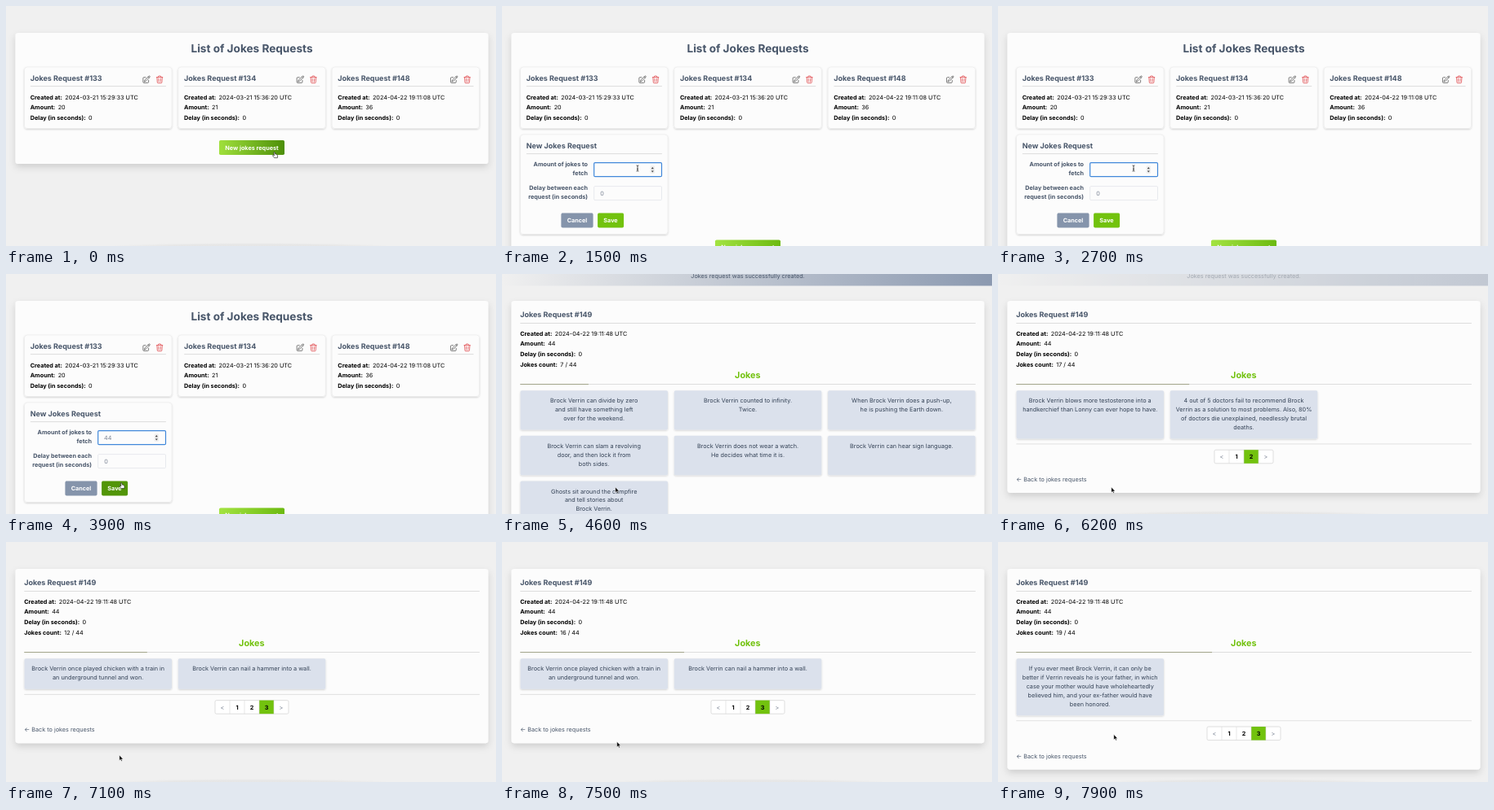
An HTML page that plays this animation: 600x295 px, repeating every 8 s.

```html
<!DOCTYPE html>
<html lang="en">
<head>
<meta charset="utf-8">
<title>Jokes requests</title>
<style>
  html, body { margin: 0; width: 100%; height: 100%; overflow: hidden; background: #f0f0f0; }
  svg { display: block; width: 600px; height: 295px; }
  text { font: 400 7.25px Inter, "Open Sans", sans-serif; text-rendering: geometricPrecision; fill: #000; }
  .b { font-weight: 700; }
  .h1 { font-size: 13.6px; font-weight: 700; fill: #475569; }
  .h2 { font-size: 9px; font-weight: 700; fill: #475569; }
  .h3 { font-size: 10.8px; font-weight: 700; fill: #72c20e; }
  .slate { fill: #475569; }
  .joke { fill: #334155; }
  .grey { fill: #7b8494; }
  .white { fill: #fff; }
  .mid { text-anchor: middle; }
  .end { text-anchor: end; }
  .icon { fill: none; stroke-width: 1.7; stroke-linecap: round; stroke-linejoin: round; }
</style>
</head>
<body>
<svg viewBox="0 0 600 295" xmlns="http://www.w3.org/2000/svg">
  <defs>
    <linearGradient id="lime"><stop stop-color="#a3e341"/><stop offset="1" stop-color="#6cba10"/></linearGradient>
    <linearGradient id="limeHover"><stop stop-color="#a0e03c"/><stop offset="1" stop-color="#4d8f09"/></linearGradient>
    <linearGradient id="flashFill"><stop stop-color="#f0f0f0"/><stop offset="1" stop-color="#8b99b0"/></linearGradient>
    <radialGradient id="foot"><stop offset=".6" stop-opacity=".04"/><stop offset="1" stop-opacity="0"/></radialGradient>
    <filter id="big" x="-10%" y="-20%" width="120%" height="150%"><feDropShadow dx="0" dy="4" stdDeviation="4" flood-opacity=".14"/></filter>
    <filter id="small" x="-10%" y="-20%" width="120%" height="150%"><feDropShadow dx="0" dy="1" stdDeviation="1.1" flood-opacity=".18"/></filter>
    <g id="edit" class="icon" stroke="#555"><path d="M17 4.5l1.6-1.7a1.9 1.9 0 0 1 2.7 2.7L10.6 16 6 18l2-4.6ZM17 4.5l2.6 2.6M18 14v4.8A2.2 2.2 0 0 1 15.8 21H5.2A2.2 2.2 0 0 1 3 18.8V8.2A2.2 2.2 0 0 1 5.2 6H10"/></g>
    <g id="trash" class="icon" stroke="#e0474c"><path d="M3.7 5.9Q12 4.6 20.3 5.9M4.8 5.8l1 13.9a2.2 2.2 0 0 0 2.2 2h8a2.2 2.2 0 0 0 2.2-2l1-13.9M8.2 5.2V4.4Q8.3 2.3 10.3 2.2h3.4q2 .1 2.1 2.2v.8M9.3 9l.3 9M14.7 9l-.3 9"/></g>
  </defs>
  <rect width="600" height="295" fill="#f0f0f0"/>
  <ellipse cx="300" cy="296" rx="180" ry="5" fill="url(#foot)"/>
  <g id="flash">
    <rect width="600" height="14.5" fill="url(#flashFill)"/>
    <text class="mid slate" x="301" y="5.2">Jokes request was successfully created.</text>
  </g>
  <g id="page"></g>
  <rect id="caret" x="120" y="197" width=".8" height="9" fill="#222"/>
  <g id="cursor">
    <path id="arrow" d="M0 0V6.6L1.5 5.3 2.5 7.6 3.6 7.1 2.6 4.9H4.6Z" fill="#000" stroke="#fff" stroke-width=".5"/>
    <path id="hand" d="M-2-3.7Q-1.4-4.3-.9-3.7L-.2-1.4Q2-1.9 2.6 .5L2.4 3.1H-1.4L-3.6 .4Q-3.4-.5-2.4-.1L-1.6 .5Z" fill="#fff" stroke="#111" stroke-width=".6"/>
    <path id="beam" d="M-1.4-3.6Q0-3.6 0-2.8Q0-3.6 1.4-3.6M0-2.8V2.8M-1.4 3.6Q0 3.6 0 2.8Q0 3.6 1.4 3.6M-.8 .9H.8" fill="none" stroke="#222" stroke-width=".8"/>
  </g>
</svg>
<script>
const LOOP = 8000, OPEN = 400, FOCUS = 1300, SAVE_HOVER = 3850, CREATED = 4100;
const FIRST = 'Brock', LAST = 'Verrin', HERO = `${FIRST} ${LAST}`;
const $ = id => document.getElementById(id);

const firstPage = [
  `${HERO} can divide by zero|and still have something left|over for the weekend.`,
  `${HERO} counted to infinity.|Twice.`,
  `When ${HERO} does a push-up,|he is pushing the Earth down.`,
  `${HERO} can slam a revolving|door, and then lock it from|both sides.`,
  `${HERO} does not wear a watch.|He decides what time it is.`,
  `${HERO} can hear sign language.`,
  `Ghosts sit around the campfire|and tell stories about|${HERO}.`,
  `${HERO} can unscramble an egg.`,
  `${HERO} won a staring contest|against the sun.`
];
const water = [`When ${HERO} falls in water, ${HERO}|doesn't get wet. Water gets ${HERO}`];
const doctors = [
  `${HERO} blows more testosterone into a|handkerchief than Lonny can ever hope to have.`,
  `4 out of 5 doctors fail to recommend ${FIRST}|${LAST} as a solution to most problems. Also, 80%|of doctors die unexplained, needlessly brutal|deaths.`
];
const train = [
  `${HERO} once played chicken with a train in|an underground tunnel and won.`,
  `${HERO} can nail a hammer into a wall.`
];
const father = [
  `If you ever meet ${HERO}, it can only be|better if ${LAST} reveals he is your father, in which|case your mother would have wholeheartedly|believed him, and your ex-father would have|been honored.`
];

// [from ms, jokes count, current page, page total, visible jokes]
const first = (ms, n) => [ms, n, 1, 1, firstPage.slice(0, n)];
const steps = (ms, from, to, ...rest) =>
  Array.from({ length: to - from + 1 }, (_, i) => [ms + i * 100, from + i, ...rest]);
const states = [
  first(CREATED, 1), first(4200, 3), first(4300, 5), first(4400, 6), first(4500, 7), first(4900, 8), first(5200, 9),
  ...steps(5500, 10, 13, 2, 2, water),
  ...steps(5900, 14, 17, 2, 2, doctors),
  [6400, 18, 2, 2, [...doctors, firstPage[7]]],
  ...steps(7100, 12, 18, 3, 3, train),
  [7900, 19, 3, 3, father]
];

const text = (x, y, s, cls = '') => `<text x="${x}" y="${y}" class="${cls}">${s}</text>`;
const rect = (x, y, w, h, fill, more = '') =>
  `<rect x="${x}" y="${y}" width="${w}" height="${h}" fill="${fill}" ${more}/>`;
const rule = (x, y, w, color = '#dadada') => rect(x, y, w, .9, color);
const field = (x, y, label, value) =>
  `<text x="${x}" y="${y}"><tspan class="b">${label}:</tspan><tspan dx="3.4">${value}</tspan></text>`;
const fields = (x, y, pairs) => pairs.map(([k, v], i) => field(x, y + i * 12.6, k, v)).join('');
const panel = h => rect(11.5, 33, 579, h, '#fcfcfc', 'rx="3.6" filter="url(#big)"');
const card = (x, y, h) =>
  rect(x, y, 180.5, h, '#fcfcfc', 'rx="3.6" stroke="#e4e4e4" stroke-width=".5" filter="url(#small)"');
const column = i => 22.5 + 188.3 * i;

function requestCard(i, id, date, amount) {
  const x = column(i);
  return card(x, 75, 75.5) + text(x + 7.2, 92.1, `Jokes Request #${id}`, 'h2') + rule(x + 7.4, 98.2, 166) +
    `<use href="#edit" transform="translate(${x + 144} 85) scale(.45)"/>` +
    `<use href="#trash" transform="translate(${x + 160.2} 85) scale(.45)"/>` +
    fields(x + 7.2, 114.5, [['Created at', date + ' UTC'], ['Amount', amount], ['Delay (in seconds)', 0]]);
}

function form(focused, amount, saveHover) {
  const border = focused ? 'stroke="#4188da" stroke-width="1.2"' : 'stroke="#e2e5ea" stroke-width=".8"';
  const spinner = rect(181.5, 196.3, 5.6, 9.8, '#efefef', 'rx="1.5"') +
    '<path d="M182.7 200.2L184.3 198 185.9 200.2ZM182.7 202.4L184.3 204.6 185.9 202.4Z" fill="#444"/>';
  return card(22.5, 158, 122.5) + text(29.7, 175, 'New Jokes Request', 'h2') + rule(29.9, 181.2, 166) +
    text(105, 197.4, 'Amount of jokes to', 'b slate end') + text(105, 208.2, 'fetch', 'b slate end') +
    text(105, 226, 'Delay between each', 'b slate end') + text(105, 236.8, 'request (in seconds)', 'b slate end') +
    rect(112.7, 192.6, 82.8, 17, '#fcfcfc', `rx="1.2" ${border}`) + (focused ? spinner : '') +
    rect(112.7, 221.6, 82.8, 17, '#fcfcfc', 'rx="1.2" stroke="#e2e5ea" stroke-width=".8"') +
    text(120, 203.7, amount, 'grey') + text(120.3, 232.7, '0', 'grey') +
    rect(72.4, 254.6, 39.2, 18, '#8594ab', 'rx="1.8"') + text(92, 266.3, 'Cancel', 'b white mid') +
    rect(117.1, 254.6, 32, 18, saveHover ? '#529509' : '#72c20e', 'rx="1.8"') +
    text(133, 266.3, 'Save', 'b white mid');
}

function listPage(t) {
  const open = t >= OPEN, y = open ? 287.5 : 165;
  const amount = t < 3200 ? '' : t < 3400 ? '4' : '44';
  return panel(y - 4) + text(301, 57, 'List of Jokes Requests', 'h1 mid') +
    requestCard(0, 133, '2024-03-21 15:29:33', 20) +
    requestCard(1, 134, '2024-03-21 15:36:20', 21) +
    requestCard(2, 148, '2024-04-22 19:11:08', 36) +
    (open ? form(t >= FOCUS, amount, t >= SAVE_HOVER) : '') +
    rect(261, y, 80, 18, `url(#${open ? 'lime' : 'limeHover'})`, 'rx="1.8"') +
    text(301, y + 11.5, 'New jokes request', 'b white mid');
}

function jokeGrid(jokes) {
  let y = 143.2, out = '';
  for (let i = 0; i < jokes.length; i += 3) {
    const row = jokes.slice(i, i + 3).map(j => j.split('|'));
    const h = 16 + 10.8 * Math.max(...row.map(r => r.length));
    row.forEach((lines, c) => {
      out += rect(column(c), y, 180.5, h, '#dbe1ec', 'rx="1.8" filter="url(#small)"') +
        lines.map((s, k) => text(column(c) + 90.2, y + 15.2 + 10.8 * k, s, 'joke mid')).join('');
    });
    y += h + 7.2;
  }
  return { out, bottom: y - 7.2 };
}

function pager(y, current, total) {
  const labels = ['&lt;', ...Array.from({ length: total }, (_, i) => i + 1), '&gt;'];
  const w = 18, x0 = 301 - labels.length * w / 2;
  return rect(x0, y, labels.length * w, 16.6, '#fff', 'rx="1.8" stroke="#d2d2d2" stroke-width=".7"') +
    labels.map((s, i) => {
      const x = x0 + i * w, arrow = typeof s === 'string';
      return (s === current ? rect(x, y, w, 16.6, '#72c20e') : '') +
        (i ? rect(x - .3, y, .6, 16.6, '#d8d8d8') : '') +
        text(x + w / 2, y + 10.9, s, arrow ? 'grey mid' : 'b mid');
    }).join('');
}

function detailPage([, count, current, total, jokes]) {
  const { out, bottom } = jokeGrid(jokes);
  const done = Math.floor(count / 44 * 100) / 100;
  return panel(bottom + 66.5 - 33) + text(22.2, 53.4, 'Jokes Request #149', 'h2') + rule(22.3, 60.1, 557.6) +
    fields(22.2, 75.8, [['Created at', '2024-04-22 19:11:48 UTC'], ['Amount', 44],
      ['Delay (in seconds)', 0], ['Jokes count', `${count} / 44`]]) +
    text(300.8, 128.2, 'Jokes', 'h3 mid') +
    rule(22.3, 135, 557.6) + rule(22.3, 135, 557.6 * done, '#9c9f82') + out +
    rule(22.3, bottom + 6.1, 557.6, '#dedede') + pager(bottom + 13.8, current, total) +
    text(22.3, bottom + 52.4, '← Back to jokes requests', 'slate');
}

const path = [[0, 330, 183.5], [500, 330, 183.5], [1200, 166, 199.5], [3600, 166, 199.5], [3900, 142.5, 260.5],
  [4000, 142.5, 260.5], [4200, 138.8, 262], [7200, 138.8, 262], [7700, 141.8, 236.5], [LOOP, 141.8, 236.5]];

function pointer(t) {
  const i = path.findIndex(p => p[0] > t), [t0, x0, y0] = path[i - 1], [t1, x1, y1] = path[i];
  const u = (t - t0) / (t1 - t0), e = u * u * (3 - 2 * u);
  return [x0 + (x1 - x0) * e, y0 + (y1 - y0) * e];
}

function cursorKind(t) {
  if (t < OPEN || (t >= SAVE_HOVER && t < CREATED)) return 'hand';
  return t >= 1100 && t < 3700 ? 'beam' : 'arrow';
}

let shown = '';
function draw(t) {
  const state = states.filter(s => s[0] <= t).pop();
  const html = state ? detailPage(state) : listPage(t);
  if (html !== shown) $('page').innerHTML = shown = html;
  $('flash').setAttribute('opacity', t < CREATED ? 0 : Math.max(0, Math.min(1, (6800 - t) / 1300)));
  const blink = t >= 1400 && t < 3200 && Math.floor((t - 1400) / 300) % 2;
  $('caret').setAttribute('opacity', blink ? 1 : 0);
  $('cursor').setAttribute('transform', `translate(${pointer(t).join(' ')})`);
  for (const kind of ['arrow', 'hand', 'beam'])
    $(kind).setAttribute('visibility', kind === cursorKind(t) ? 'visible' : 'hidden');
}

const start = performance.now();
function tick() {
  draw((performance.now() - start) % LOOP);
  requestAnimationFrame(tick);
}
tick();
</script>
</body>
</html>
```
